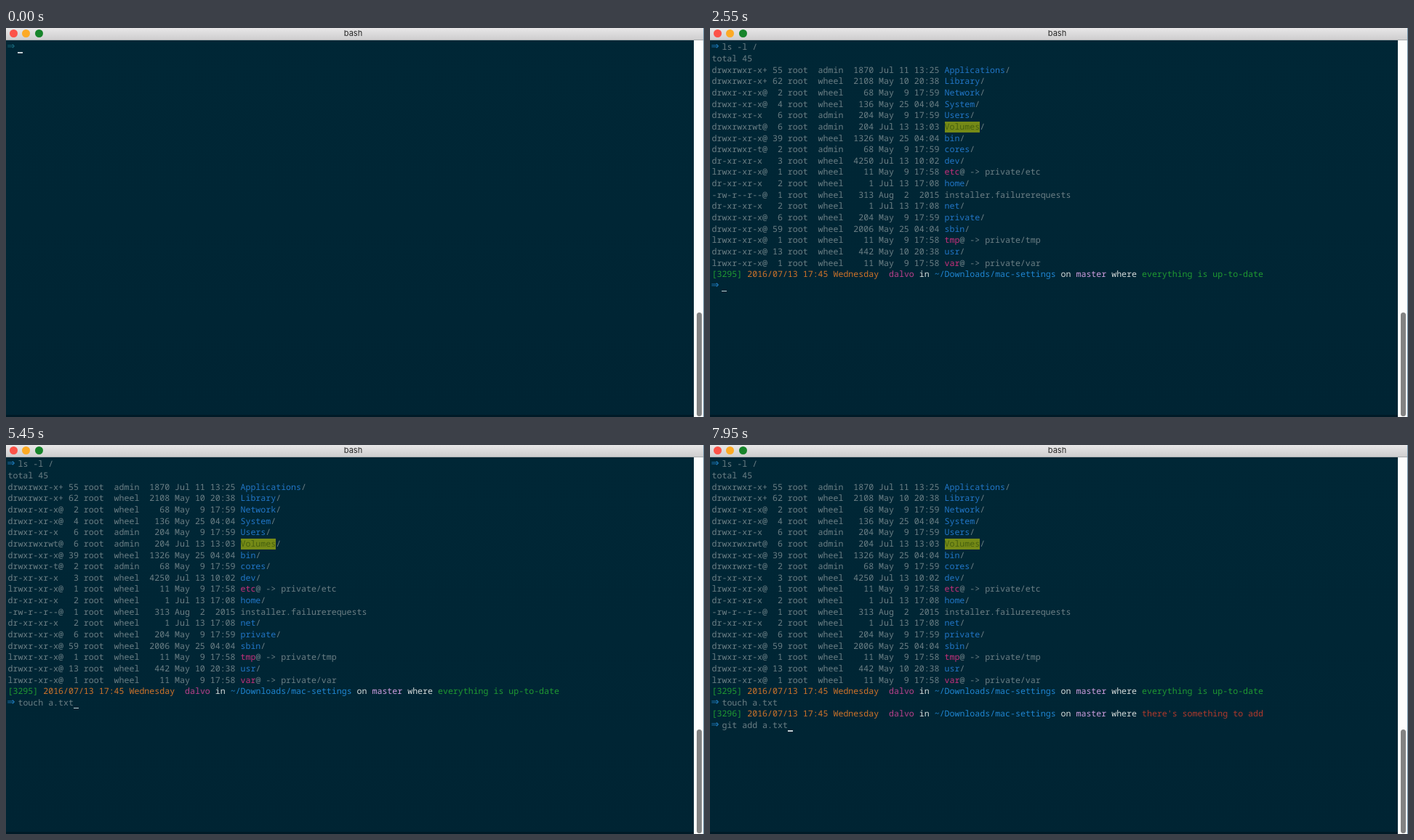
Write an HTML page that moves like this. It is 960 px wide and 536 px high and loops after 8 s.

```html
<!DOCTYPE html>
<html lang="en">
<head>
<meta charset="utf-8">
<title>bash</title>
<style>
  html, body { margin: 0; width: 100%; height: 100%; overflow: hidden; background: #002635; }
  #stage { position: absolute; left: 0; top: 0; width: 960px; height: 536px; overflow: hidden;
    background: linear-gradient(#002736, #002635 50%, #002433); }
  #stage div { position: absolute; }
  #bar { left: 0; top: 0; width: 960px; height: 17px; box-sizing: border-box;
    background: linear-gradient(#e8e7e8, #cfcecf); border-bottom: 1px solid #a9acae; }
  #title { left: 0; top: 0; width: 955px; text-align: center; color: #262626;
    font: 11px/15px Inter, sans-serif; }
  .light { top: 1.5px; width: 11px; height: 11px; border-radius: 50%; }
  #track { left: 946px; top: 17px; width: 13px; height: 519px; background: #fdfdfd; }
  #edge { left: 959px; top: 0; width: 1px; height: 536px; background: #6d8fa6; }
  #thumb { left: 949.5px; top: 392px; width: 7px; height: 143px; border-radius: 3.5px; background: #828282; }
  #floor { left: 0; top: 533px; width: 946px; height: 3px; background: #001a27; }
  .row { left: 2.5px; white-space: pre; color: #6b7f85; text-rendering: geometricPrecision;
    font: 300 11.6px/15.64px "Noto Sans Mono", monospace; }
  .arrow { position: absolute; left: -1px; top: -1px; color: #2080c4; font: 13px/15.64px "DejaVu Sans", sans-serif; }
  .b { color: #2176c7 } .m { color: #c6307c } .g { color: #1f9a32 } .o { color: #d0742a }
  .p { color: #b8408c } .w { color: #d5dcdb } .d { color: #1f86d2 } .v { color: #cf9fe0 } .r { color: #b23a2c }
  .h { color: #46600f; background: #758a17 }
  #cursor { width: 7px; height: 1.6px; background: #c3cfd3; }
</style>
</head>
<body>
<div id="stage">
  <div id="bar"></div>
  <div class="light" style="left:5px;background:#fc5349"></div>
  <div class="light" style="left:22px;background:#fcaa25"></div>
  <div class="light" style="left:39.5px;background:#17842b"></div>
  <div id="title">bash</div>
  <div id="floor"></div>
  <div id="track"></div>
  <div id="thumb"></div>
  <div id="edge"></div>
  <div id="cursor"></div>
</div>
<script>
const LOOP = 8000, PITCH = 15.64, ADVANCE = 6.96, LEFT = 2.5, TOP = 19.4;
const stage = document.getElementById('stage');
const cursor = document.getElementById('cursor');

// {x:text} gives text the colour class x
const listing = `total 45
drwxrwxr-x+ 55 root  admin  1870 Jul 11 13:25 {b:Applications}/
drwxrwxr-x+ 62 root  wheel  2108 May 10 20:38 {b:Library}/
drwxr-xr-x@  2 root  wheel    68 May  9 17:59 {b:Network}/
drwxr-xr-x@  4 root  wheel   136 May 25 04:04 {b:System}/
drwxr-xr-x   6 root  admin   204 May  9 17:59 {b:Users}/
drwxrwxrwt@  6 root  admin   204 Jul 13 13:03 {h:Volumes}/
drwxr-xr-x@ 39 root  wheel  1326 May 25 04:04 {b:bin}/
drwxrwxr-t@  2 root  admin    68 May  9 17:59 {b:cores}/
dr-xr-xr-x   3 root  wheel  4250 Jul 13 10:02 {b:dev}/
lrwxr-xr-x@  1 root  wheel    11 May  9 17:58 {m:etc}@ -> private/etc
dr-xr-xr-x   2 root  wheel     1 Jul 13 17:08 {b:home}/
-rw-r--r--@  1 root  wheel   313 Aug  2  2015 installer.failurerequests
dr-xr-xr-x   2 root  wheel     1 Jul 13 17:08 {b:net}/
drwxr-xr-x@  6 root  wheel   204 May  9 17:59 {b:private}/
drwxr-xr-x@ 59 root  wheel  2006 May 25 04:04 {b:sbin}/
lrwxr-xr-x@  1 root  wheel    11 May  9 17:58 {m:tmp}@ -> private/tmp
drwxr-xr-x@ 13 root  wheel   442 May 10 20:38 {b:usr}/
lrwxr-xr-x@  1 root  wheel    11 May  9 17:58 {m:var}@ -> private/var`.split('\n');

const status = (number, note) =>
  `{g:[${number}]} {o:2016/07/13 17:45 Wednesday}  {p:dalvo} {w:in} {d:~/Downloads/mac-settings} {w:on} {v:master} {w:where} ${note}`;

// Each prompt: output printed before it, when it shows, and when each key lands
const prompts = [
  { at: 0, before: [], text: 'ls -l /',
    keys: [800, 950, 1100, 1350, 1550, 1700, 1800] },
  { at: 2300, before: [...listing, status(3295, '{g:everything is up-to-date}')], text: 'touch a.txt',
    keys: [4000, 4150, 4250, 4350, 4500, 4650, 4800, 5000, 5150, 5300, 5450] },
  { at: 5750, before: [status(3296, "{r:there's something to add}")], text: 'git add a.txt',
    keys: [6150, 6250, 6350, 6450, 6550, 6650, 6750, 6850, 6950, 7050, 7140, 7300, 7400] }
];

const markup = line => line.replace(/>/g, '&gt;').replace(/\{(\w):([^}]*)\}/g, '<span class="$1">$2</span>');

let rowCount = 0;
function addRow(html) {
  const row = document.createElement('div');
  row.className = 'row';
  row.style.top = TOP + PITCH * rowCount++ + 'px';
  row.innerHTML = html;
  stage.append(row);
  return row;
}

for (const p of prompts) {
  p.rows = p.before.map(line => addRow(markup(line)));
  p.index = rowCount;
  const row = addRow('<span class="arrow">⇒</span>  <span></span>');
  p.rows.push(row);
  p.typed = row.lastChild;
}
const firstArrow = stage.querySelector('.arrow');

function render(t) {
  for (const p of prompts) {
    const shown = t >= p.at;
    p.rows.forEach(row => row.style.visibility = shown ? 'visible' : 'hidden');
    if (!shown) continue;
    const count = p.keys.filter(key => key <= t).length;
    p.typed.textContent = p.text.slice(0, count);
    cursor.style.left = LEFT + ADVANCE * (2 + count) + 'px';
    cursor.style.top = 33.2 + PITCH * p.index + 'px';
  }
  firstArrow.style.color = t < 300 ? '#1b6e80' : '';
}

const start = performance.now();
function tick() {
  render((performance.now() - start) % LOOP);
  requestAnimationFrame(tick);
}
tick();
</script>
</body>
</html>
```
